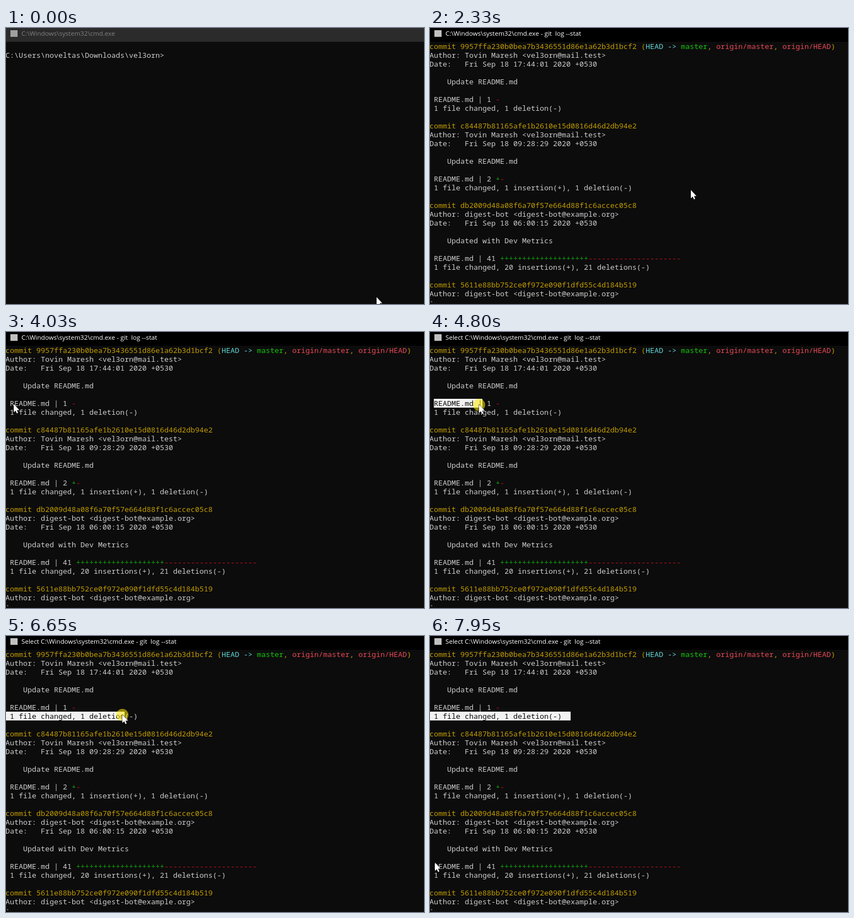
These frames come from a looping animation (758 by 500 pixels, 8 s). An HTML page with a canvas:

```html
<!DOCTYPE html>
<html lang="en">
<head>
<meta charset="utf-8">
<title>Terminal session</title>
<style>
  html, body { margin: 0; width: 100%; height: 100%; overflow: hidden; background: #0c0c0c; }
  canvas { display: block; }
</style>
</head>
<body>
<canvas id="stage" width="758" height="500"></canvas>
<script>
const ctx = document.getElementById('stage').getContext('2d');
const LOOP = 8000, TICK = 77, CELL = 8, ROW = 16, LEFT = -1, TOP = 25;
const CLICK = 450, RELEASE = 530, CLEAR = 1160, TYPE = 1630, ENTER = 2180, OUTPUT = 2330;
const BACK = '#0c0c0c', TEXT = '#cccccc', YELLOW = '#c19c00', CYAN = '#61d6d6',
      LIME = '#16c60c', PINK = '#e74856', GREEN = '#13a10e', RED = '#c50f1f';

// A row is a list of [text, colour] runs.
const plain = text => [[text, TEXT]];
const commit = (hash, ...refs) => [['commit ' + hash, YELLOW], ...refs];
const author = (name, mail) => plain(`Author: ${name} <${mail}>`);
const date = text => plain(`Date:   Fri Sep 18 ${text} 2020 +0530`);
const stat = (count, plus, minus) => [
  [` README.md | ${count} `, TEXT], ['+'.repeat(plus), GREEN], ['-'.repeat(minus), RED]];
const person = author('Tovin Maresh', 'vel3orn@mail.test');
const bot = author('digest-bot', 'digest-bot@example.org');
const entry = (head, who, when, message, stats, summary) =>
  [head, who, date(when), [], plain('    ' + message), [], stats, plain(' 1 file changed, ' + summary), []];

const log = [
  ...entry(commit('9957ffa230b0bea7b3436551d86e1a62b3d1bcf2', [' (', YELLOW], ['HEAD -> ', CYAN],
      ['master', LIME], [', ', YELLOW], ['origin/master', PINK], [', ', YELLOW], ['origin/HEAD', PINK], [')', YELLOW]),
    person, '17:44:01', 'Update README.md', stat(1, 0, 1), '1 deletion(-)'),
  ...entry(commit('c84487b81165afe1b2610e15d0816d46d2db94e2'),
    person, '09:28:29', 'Update README.md', stat(2, 1, 1), '1 insertion(+), 1 deletion(-)'),
  ...entry(commit('db2009d48a08f6a70f57e664d88f1c6accec05c8'),
    bot, '06:00:15', 'Updated with Dev Metrics', stat(41, 20, 21), '20 insertions(+), 21 deletions(-)'),
  commit('5611e88bb752ce0f972e090f1dfd55c4d184b519'), bot, plain(':')
];
const prompt = 'C:\\Users\\noveltas\\Downloads\\vel3orn>';

// Each move eases to a point; a drag selects from a cell and holds until the next move.
const home = [672, 488];
const moves = [
  { start: 70, end: 300, to: [473, 294] },
  { start: 2710, end: 3480, to: [58, 148] },
  { start: 3560, end: 4030, to: [14, 131] },
  { start: 4490, end: 5110, to: [125, 132], drag: { row: 6, col: 1 } },
  { start: 5420, end: 5880, to: [6, 146] },
  { start: 6110, end: 6880, to: [251, 143], drag: { row: 7, col: 0 } },
  { start: 6950, end: 7950, to: [9, 411], bend: [100, 640] }
];
moves.forEach((move, i) => move.from = i ? moves[i - 1].to : home);

function positionOn({ start, end, from, to, bend }, t) {
  const steps = Math.round((end - start) / TICK) + 1;
  const step = Math.min(steps, 1 + Math.floor((t - start) / TICK + 0.1));
  const u = 1 - (1 - step / steps) ** 1.4;
  return from.map((a, i) => {
    const mid = bend ? bend[i] : (a + to[i]) / 2;
    return Math.round(a * (1 - u) ** 2 + 2 * u * (1 - u) * mid + to[i] * u * u);
  });
}

function box(color, x, y, w, h) {
  ctx.fillStyle = color;
  ctx.fillRect(x, y, w, h);
}

function drawRow(runs, row, override) {
  ctx.font = '500 13.333px "Noto Sans Mono", monospace';
  let col = 0;
  for (const [text, color] of runs) {
    ctx.fillStyle = override || color;
    ctx.fillText(text, LEFT + col * CELL, TOP + row * ROW + 13);
    col += text.length;
  }
}

function drawShell(t) {
  const command = t < CLEAR ? '' : t < TYPE ? 'cls' : 'git log --stat';
  drawRow(plain(prompt + command), 1);
  // Input shows the caret, the next blink hides it.
  const blink = time => Math.floor((time + 20) / 500);
  const input = [RELEASE, CLEAR, TYPE, ENTER].findLast(time => time <= t);
  if (blink(t) !== blink(input)) return;
  const [col, row] = t < ENTER ? [prompt.length + command.length, 1] : [0, 2];
  box(TEXT, LEFT + col * CELL, TOP + row * ROW + 12, CELL, 4);
}

function drawSelection({ row, col }, x) {
  const left = LEFT + col * CELL, top = TOP + row * ROW;
  const right = LEFT + (Math.floor((x - LEFT) / CELL) + 1) * CELL;
  ctx.save();
  ctx.beginPath();
  ctx.rect(left, top, right - left, ROW);
  ctx.clip();
  box('#f2f2f2', left, top, right - left, ROW);
  drawRow(log[row], row, BACK);
  ctx.restore();
}

function drawTitle(t, selecting) {
  const active = t >= CLICK;
  box(active ? '#000' : '#2b2b2b', 0, 0, 758, TOP);
  box(active ? '#c0c0c0' : '#a0a0a0', 8, 4, 13, 12);
  ctx.fillStyle = active ? '#fff' : '#808080';
  ctx.font = '11.65px "Open Sans", sans-serif';
  ctx.fillText((selecting ? 'Select ' : '') + 'C:\\Windows\\system32\\cmd.exe' +
    (t >= ENTER ? ' - git  log --stat' : ''), 28, 14);
}

const arrow = new Path2D('M0 -.5V14.6L3.4 11.4 5.7 16.4 7.9 15.4 5.7 10.5H10.3Z');

function drawPointer([x, y], pressed) {
  if (pressed) {
    ctx.fillStyle = 'rgba(255, 235, 0, .55)';
    ctx.beginPath();
    ctx.arc(x, y, 11, 0, 7);
    ctx.fill();
  }
  ctx.save();
  ctx.translate(x, y);
  ctx.strokeStyle = '#000';
  ctx.stroke(arrow);
  ctx.fillStyle = '#fff';
  ctx.fill(arrow);
  ctx.restore();
}

function draw(t) {
  const started = moves.filter(move => move.start <= t);
  const current = started.at(-1);
  const selection = started.findLast(move => move.drag);
  box(BACK, 0, 0, 758, 500);
  if (t < OUTPUT) drawShell(t);
  else log.forEach((runs, row) => drawRow(runs, row));
  if (selection) drawSelection(selection.drag, positionOn(selection, t)[0]);
  box(BACK, 0, 497, 758, 3);
  drawTitle(t, selection);
  drawPointer(current ? positionOn(current, t) : home,
    current?.drag || (t >= CLICK && t < RELEASE));
}

function tick() {
  draw(performance.now() % LOOP);
  requestAnimationFrame(tick);
}
tick();
</script>
</body>
</html>
```
